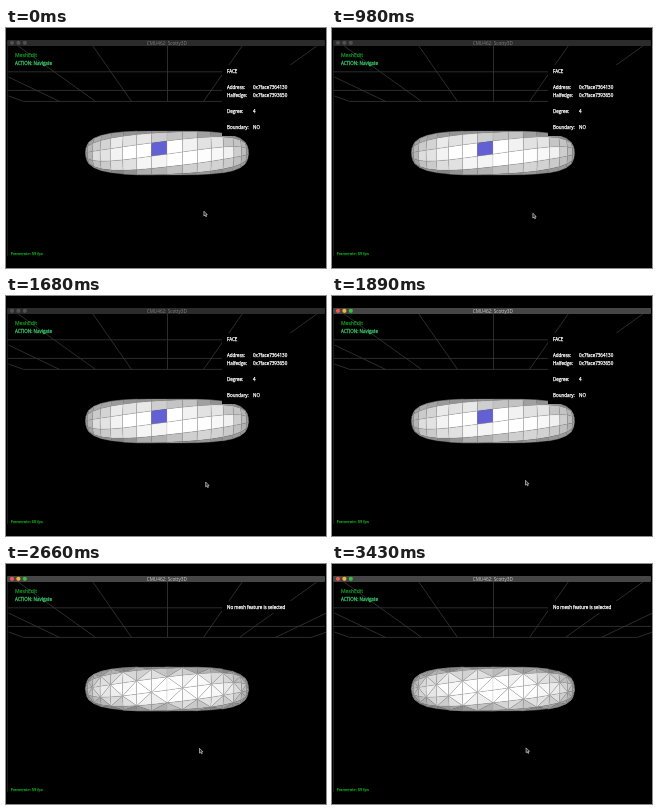
These frames come from a looping animation (320x240 px, 3.92 s). An HTML page:

```html
<!DOCTYPE html>
<html lang="en">
<head>
<meta charset="utf-8">
<title>Mesh editor</title>
<style>
  html, body { margin: 0; width: 100%; height: 100%; overflow: hidden; background: #000; }
  svg { display: block; width: 100vw; height: 100vh; font-family: "Open Sans", "Noto Sans", sans-serif; font-size: 4.5px; }
  .panel text { fill: #fff; stroke: #fff; stroke-width: .25; }
  .grid path { fill: none; stroke: #383838; stroke-width: .8; }
  #title { text-anchor: middle; font-size: 4.65px; }
</style>
</head>
<body>
<svg viewBox="0 0 320 240">
  <rect width="320" height="240"/>
  <g class="grid" id="grid"></g>
  <g id="quads" stroke-linejoin="round"></g>
  <g id="tris" stroke-linejoin="round"></g>
  <g class="panel" id="facePanel"><rect x="216" y="37" width="104" height="71"/></g>
  <g class="panel" id="emptyPanel">
    <rect x="216" y="37" width="104" height="12"/>
    <text x="221" y="44.8">No mesh feature is selected</text>
  </g>
  <path d="M1.5 18V228" stroke="#2a2a2a" stroke-width=".7"/>
  <rect id="bar" x="1" y="12" width="318" height="6" rx="1"/>
  <g id="lights"></g>
  <text id="title" x="160.8" y="16.7">CMU462: Scotty3D</text>
  <text x="9" y="28.8" font-size="5.1" fill="#128c22" stroke="#128c22" stroke-width=".25">MeshEdit</text>
  <text x="9" y="37" fill="#35b866" stroke="#35b866" stroke-width=".3">ACTION: Navigate</text>
  <text id="rate" x="4.7" y="226.8" font-size="3.95" fill="#0d961c" stroke="#0d961c" stroke-width=".25"></text>
  <path id="cursor" d="M0 0V4.8L1.1 3.8L1.9 5.5L2.7 5.2L2 3.5L3.4 3.4Z" fill="#222" stroke="#ddd" stroke-width=".65"/>
</svg>
<script>
const LOOP = 3920, STEP = 70;
const SELECT_END = 2100, FOCUS = 1890;
const CURSOR = [
  [0, 197.9, 183.2], [840, 197.9, 183.2], [1120, 203.8, 187.3],
  [1540, 203.8, 187.3], [1890, 193.5, 184.3],
  [2940, 193.5, 184.3], [3010, 196.9, 185], [3150, 196.9, 184.6],
  [3430, 194.1, 183.9], [LOOP, 194.1, 183.9]
];
const $ = id => document.getElementById(id);
const rad = deg => deg * Math.PI / 180;
const clamp = (v, lo, hi) => Math.max(lo, Math.min(hi, v));

function add(parent, tag, attrs, text) {
  const el = document.createElementNS("http://www.w3.org/2000/svg", tag);
  for (const k in attrs) el.setAttribute(k, attrs[k]);
  if (text) el.textContent = text;
  parent.appendChild(el);
  return el;
}

// Perspective floor lines, fanning out from a point behind the mesh
function drawGrid() {
  const vx = 161.5, vy = 125, far = 73.4, gap = 36;
  let d = `M${vx - 4 * gap} ${far}H${vx + 4 * gap}M1 62.4H319M1 43.8H319`;
  for (let i = -4; i <= 4; i++) {
    const dx = i * gap;
    const k = Math.min((vy - 18) / (vy - far), i ? 159 / Math.abs(dx) : 9);
    d += `M${vx + dx} ${far}L${vx + dx * k} ${vy - (vy - far) * k}`;
  }
  add($("grid"), "path", { d });
}

// Rounded, stretched body: column angle a, row angle b in degrees
function point(a, b) {
  const s = Math.sin(rad(a));
  const lat = clamp(rad(b) - .52 * s, -Math.PI / 2, Math.PI / 2);
  const up = Math.sin(lat);
  const h = 22 * (1 - Math.abs(.99 * s) ** 3.4) ** .32;
  return { x: 161 + 81.7 * s * (1 - .02 * up * up), y: 125 + h * up, a: rad(a), lat };
}

function face(parent, pts, noise, fill) {
  const mean = f => pts.reduce((t, p) => t + f(p), 0) / pts.length;
  const nz = Math.cos(mean(p => p.a)) ** .5 * Math.cos(mean(p => p.lat));
  const v = Math.round(255 * clamp(.42 + .62 * nz + noise, .4, 1));
  const points = pts.map(p => p.x.toFixed(2) + "," + p.y.toFixed(2)).join(" ");
  add(parent, "polygon", {
    points, fill: fill || `rgb(${v},${v},${v})`, stroke: "#999", "stroke-width": .4, "stroke-opacity": .55
  });
}

function drawMesh() {
  const da = 11, db = 36;
  let seed = 7;
  const rnd = () => (seed = seed * 16807 % 2147483647) / 2147483647 - .5;
  for (let j = -4; j < 4; j++) {
    for (let i = -8; i < 8; i++) {
      const b = 3 + j * db;
      const p = [point(i * da, b), point((i + 1) * da, b),
                 point((i + 1) * da, b + db), point(i * da, b + db)];
      const flat = Math.max(...p.map(q => q.lat)) - Math.min(...p.map(q => q.lat)) < .01;
      if (flat) continue;
      face($("quads"), p, rnd() * .1, i === -1 && j === -1 ? "#6260d2" : "");
      const cut = (i + j) & 1 ? [[0, 1, 2], [0, 2, 3]] : [[0, 1, 3], [1, 2, 3]];
      for (const t of cut) face($("tris"), t.map(n => p[n]), rnd() * .05);
    }
  }
}

function drawFacePanel() {
  const rows = [
    [45, "FACE"], [61, "Address:", "0x7face7364130"], [69, "Halfedge:", "0x7face7393650"],
    [85, "Degree:", "4"], [101, "Boundary:", "NO"]
  ];
  for (const [y, key, value] of rows) {
    add($("facePanel"), "text", { x: 221, y }, key);
    if (value) add($("facePanel"), "text", { x: 247, y }, value);
  }
}

const lights = [6, 12.4, 18.8].map(cx => add($("lights"), "circle", { cx, cy: 14.8, r: 2.1 }));

function cursorAt(t) {
  const n = CURSOR.findIndex(k => k[0] > t);
  const [t0, x0, y0] = CURSOR[n - 1], [t1, x1, y1] = CURSOR[n];
  const k = (t - t0) / (t1 - t0);
  return [x0 + (x1 - x0) * k, y0 + (y1 - y0) * k];
}

function show(id, on) { $(id).style.display = on ? "" : "none"; }

function render(ms) {
  const t = Math.floor(ms % LOOP / STEP) * STEP;
  const selected = t < SELECT_END, active = t >= FOCUS;
  show("quads", selected);
  show("facePanel", selected);
  show("tris", !selected);
  show("emptyPanel", !selected);
  $("bar").setAttribute("fill", active ? "#464646" : "#2b2b2b");
  $("title").setAttribute("fill", active ? "#d0d0d0" : "#808080");
  lights.forEach((l, i) => l.setAttribute("fill", active ? ["#f4574f", "#f2b632", "#37c044"][i] : "#505050"));
  $("rate").textContent = `Framerate: ${t >= 1330 && !active ? 60 : 59} fps`;
  $("cursor").setAttribute("transform", `translate(${cursorAt(t)})`);
}

drawGrid();
drawMesh();
drawFacePanel();
const start = performance.now();
function tick() {
  render(performance.now() - start);
  requestAnimationFrame(tick);
}
tick();
</script>
</body>
</html>
```
